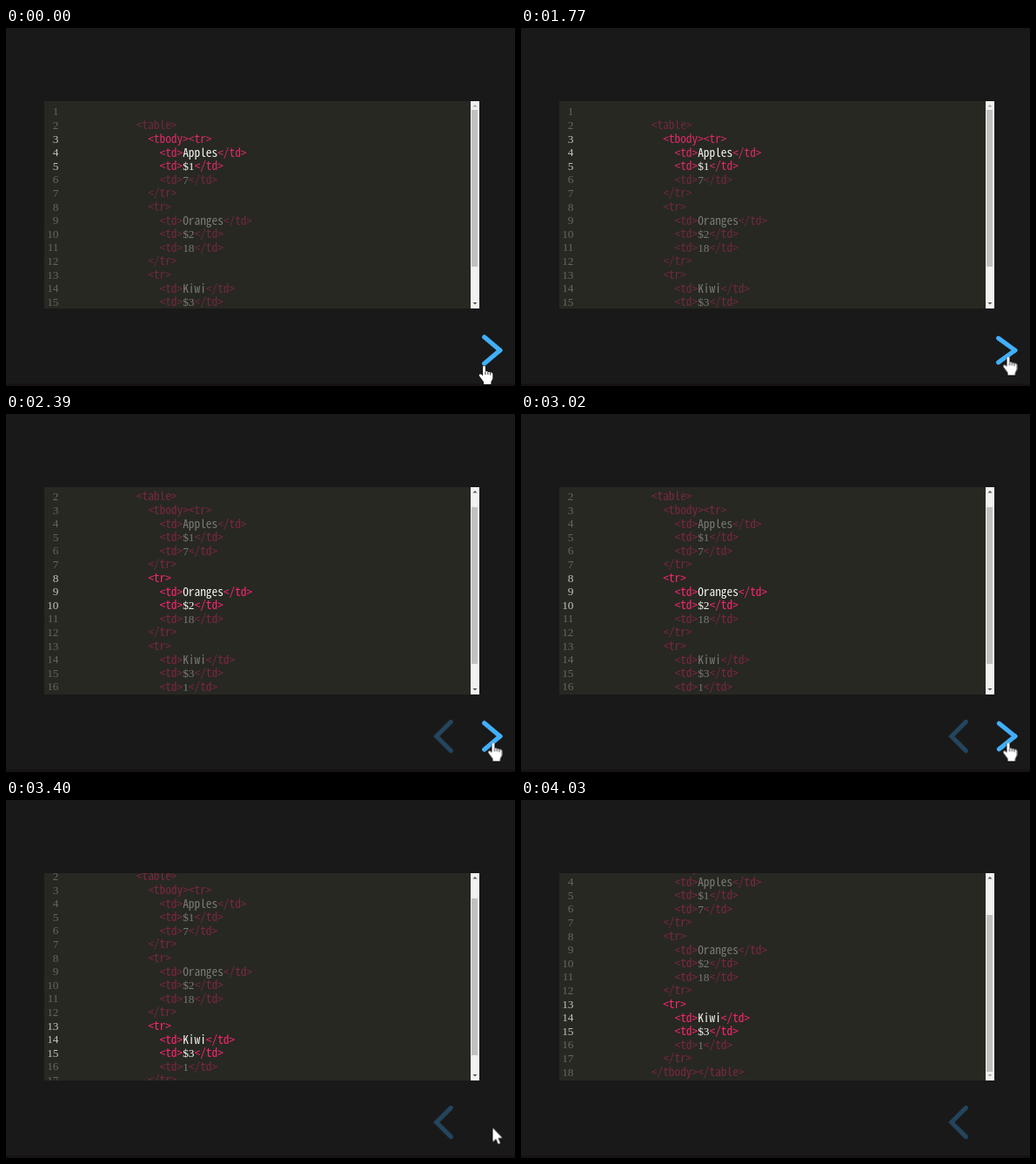
These frames come from a looping animation (585x411 px, 4540 ms). An HTML page:

```html
<!DOCTYPE html>
<html lang="en">
<head>
<meta charset="utf-8">
<title>Code highlight steps</title>
<style>
  html, body { margin: 0; width: 100%; height: 100%; overflow: hidden; background: #191919; }
  .stage { position: relative; width: 585px; height: 411px; overflow: hidden; background: #191919; }
  .stage::after { content: ""; position: absolute; inset: 408px 0 0; background: #171214; }
  .stage * { animation: 4540ms step-end infinite; }

  .editor {
    position: absolute; left: 43.5px; top: 84px; width: 500.5px; height: 238px;
    overflow: hidden; background: #272822; animation-name: scroll;
  }
  .lines {
    position: absolute; left: 0; top: 3.9px;
    font: 13.333px/15.6px "Noto Sans Mono CJK SC", "Noto Sans Mono CJK JP", "Liberation Mono", monospace;
    font-variant-ligatures: none; white-space: pre;
    transform: translateY(calc(var(--scroll) * -1px));
    animation-name: tint;
  }
  .line { position: relative; height: 15.6px; padding-left: 26.4px; opacity: .4; }
  .num, .digits { font-family: "Liberation Serif", serif; font-size: 13.333px; }
  .num { position: absolute; left: 0; top: .6px; width: 17px; text-align: right; color: #c4c4be; }
  .text, .digits { color: #f8f8f2; }
  .digits { line-height: 1; }
  .first { animation-name: first; }
  .second { animation-name: second; }
  .third { animation-name: third; }

  .bar { position: absolute; right: 0; top: 0; width: 10px; height: 238px; background: #f1f1f1; }
  .thumb {
    position: absolute; left: 1px; top: 9.5px; width: 7px; height: 180px; background: #c1c1c1;
    transform: translateY(calc(var(--scroll) * .776px));
  }
  .bar svg { position: absolute; left: 0; top: 0; }
  .up { fill: #505050; animation-name: up; }
  .down { fill: #505050; animation-name: down; }

  .overlay { position: absolute; left: 0; top: 0; z-index: 1; }
  .arrow { stroke: #42affa; stroke-width: 5.2; stroke-linecap: round; }
  .arrow line:first-child { transform: rotate(var(--angle)); }
  .arrow line:last-child { transform: rotate(calc(var(--angle) * -1)); }
  .prev { --angle: 45deg; animation-name: prev; }
  .next { animation-name: press; }
  .next-fade { animation-name: leave; }
  .cursor { fill: #fff; stroke: #000; stroke-width: 1; stroke-linejoin: round; paint-order: stroke; }
  .hand { animation-name: hand; }
  .pointer { animation-name: pointer; }

  @keyframes scroll {
    0% { --scroll: 0; }
    46.91% { --scroll: 4.2; }
    50% { --scroll: 12.6; }
    52.64% { --scroll: 16.6; }
    74.88% { --scroll: 24.4; }
    77.53% { --scroll: 41.2; }
    80.17% { --scroll: 49; }
  }
  @keyframes tint {
    0% { color: #dc2a68; }
    41.62% { color: #f92672; }
  }
  @keyframes first {
    0% { opacity: 1; }
    41.62% { opacity: .7; }
    44.27% { opacity: .4; }
  }
  @keyframes second {
    0% { opacity: .4; }
    41.62% { opacity: .7; }
    44.27% { opacity: 1; }
    69.6% { opacity: .7; }
    72.24% { opacity: .4; }
  }
  @keyframes third {
    0% { opacity: .4; }
    69.6% { opacity: .7; }
    72.24% { opacity: 1; }
  }
  @keyframes up {
    0% { fill: #a3a3a3; }
    46.91% { fill: #505050; }
  }
  @keyframes down {
    0% { fill: #505050; }
    80.17% { fill: #a3a3a3; }
  }
  @keyframes prev {
    0% { opacity: 0; }
    41.62% { opacity: .15; }
    44.27% { opacity: .3; }
  }
  @keyframes press {
    0% { --angle: 40deg; }
    38.98% { --angle: 36deg; }
    41.62% { --angle: 40deg; }
    66.51% { --angle: 39deg; }
    69.6% { --angle: 36deg; }
  }
  @keyframes leave {
    0% { opacity: 1; }
    69.6% { opacity: .5; }
    72.24% { opacity: 0; }
  }
  @keyframes hand {
    0% { transform: translate(543px, 387px); }
    11.45% { transform: translate(546px, 384px); }
    14.09% { transform: translate(549px, 381px); }
    16.74% { transform: translate(552px, 378px); }
    19.38% { transform: translate(553.5px, 376.5px); visibility: visible; }
    72.24% { transform: translate(553.5px, 376.5px); visibility: hidden; }
  }
  @keyframes pointer {
    0% { transform: translate(559.5px, 376.5px); visibility: hidden; }
    72.24% { transform: translate(559.5px, 376.5px); visibility: visible; }
    86.12% { transform: translate(563.5px, 396.5px); visibility: visible; }
    88.76% { transform: translate(563.5px, 396.5px); visibility: hidden; }
  }
</style>
</head>
<body>
<div class="stage">
  <div class="editor">
    <div class="lines"></div>
    <div class="bar">
      <div class="thumb"></div>
      <svg width="10" height="238">
        <path class="up" d="M2.5 6.5 L5 4 L7.5 6.5Z"/>
        <path class="down" d="M2.5 231 L5 233.5 L7.5 231Z"/>
      </svg>
    </div>
  </div>
  <svg class="overlay" width="585" height="411">
    <g transform="translate(494.7 370)">
      <g class="arrow prev"><path d="M16.6 -16.6 L0 0 L16.6 16.6" fill="none"/></g>
    </g>
    <g class="next-fade">
      <g transform="translate(567.8 370)">
        <g class="arrow next"><line x2="-23.6"/><line x2="-23.6"/></g>
      </g>
    </g>
    <g class="cursor hand">
      <path d="M5 2 Q6.5 -.4 8 2 V7.5 Q9.8 6.4 10.9 8 Q12.5 7 13.6 8.7 Q15.8 8.2 16.4 10 V15.5 L14.4 19.5 V22 H6 V19.3 L1 12.6 Q.2 10.6 2 10.2 Q3.5 10.2 5 12.5Z"/>
      <path d="M8 7.5 V11 M10.9 8 V11 M13.6 8.7 V11.5" stroke-width=".8"/>
    </g>
    <path class="cursor pointer" d="M0 0 V16 L3.7 12.5 L6.2 18.5 L8.6 17.5 L6.1 11.6 H11Z"/>
  </svg>
</div>
<script>
  const fruit = [['Apples', '$1', 7], ['Oranges', '$2', 18], ['Kiwi', '$3', 1]];
  const steps = ['first', 'second', 'third'];
  const indent = (n, s) => ' '.repeat(n) + s;
  const rows = [['', ''], [indent(12, '<table>'), '']];

  fruit.forEach((cells, i) => {
    rows.push([indent(14, (i ? '' : '<tbody>') + '<tr>'), steps[i]]);
    cells.forEach((cell, j) => rows.push([indent(16, `<td>${cell}</td>`), j < 2 ? steps[i] : '']));
    rows.push([indent(14, '</tr>'), '']);
  });
  rows.push([indent(12, '</tbody></table>'), '']);

  const lines = document.querySelector('.lines');

  function add(parent, tag, cls, text = '') {
    const el = document.createElement(tag);
    el.className = cls;
    el.textContent = text;
    return parent.appendChild(el);
  }

  const kind = part => part[0] === '<' ? 'tag' : /\d/.test(part) ? 'digits' : 'text';

  // Pick the font size whose character advance is 6.667px.
  const probe = add(lines, 'span', '', '0'.repeat(100));
  const advance = probe.getBoundingClientRect().width / 100;
  lines.style.fontSize = 13.333 * 6.667 / advance + 'px';
  probe.remove();

  rows.forEach(([code, step], i) => {
    const line = add(lines, 'div', 'line ' + step);
    add(line, 'span', 'num', i + 1);
    for (const part of code.match(/<[^>]+>|[^<]+/g) || [])
      add(line, 'span', kind(part), part);
  });
</script>
</body>
</html>
```
